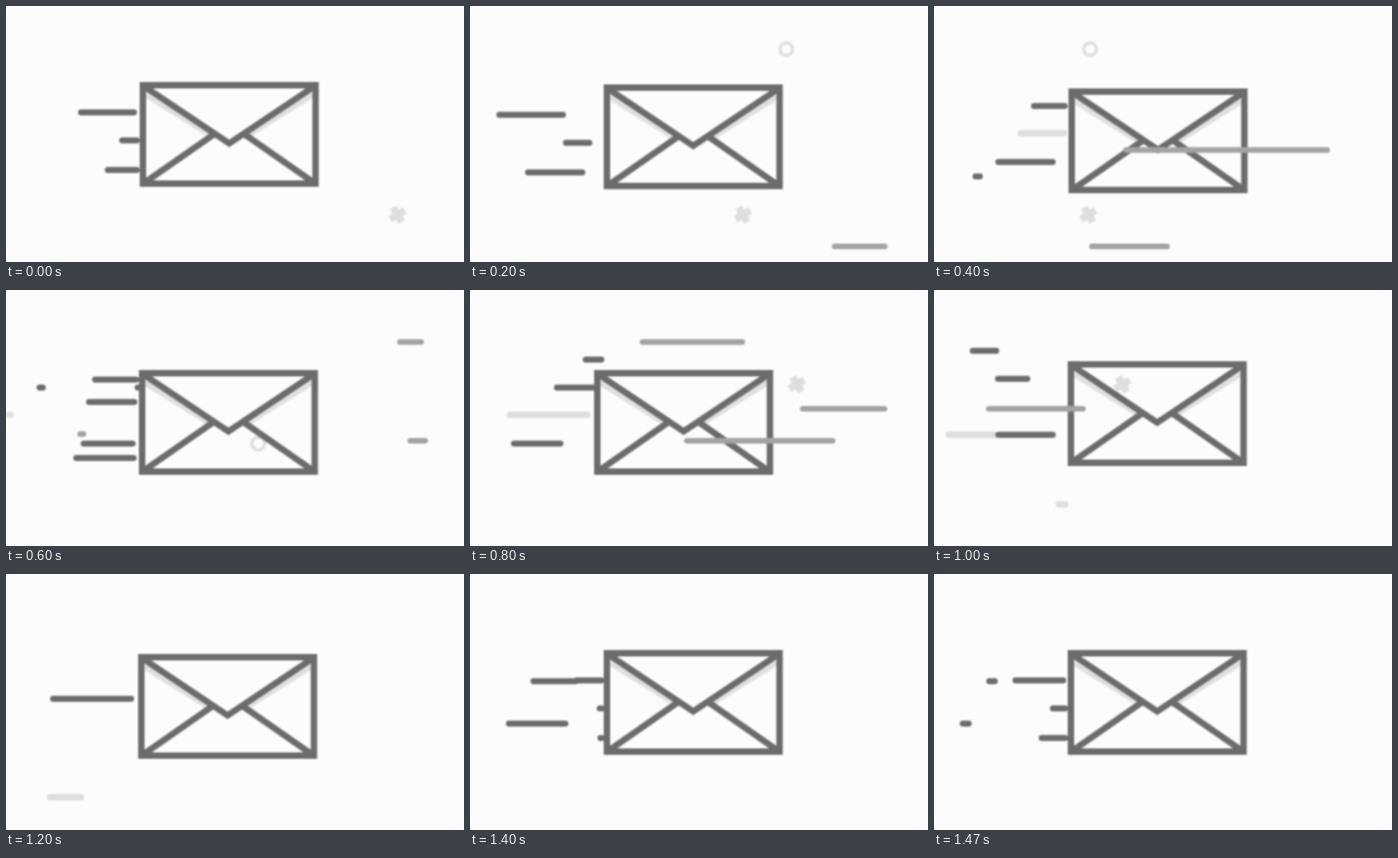
Write an HTML page with a canvas that moves like this. It is 572 px wide and 320 px high and loops after 1.59 s.

```html
<!DOCTYPE html>
<html>
<head>
<meta charset="utf-8">
<title>Flying envelope</title>
<style>
  html, body { margin: 0; width: 100%; height: 100%; overflow: hidden; background: #fcfcfc; }
  canvas { display: block; filter: blur(1.3px); }
</style>
</head>
<body>
<canvas id="stage" width="572" height="320"></canvas>
<script>
const ctx = document.getElementById('stage').getContext('2d');
const LOOP = 1590, PERIOD = 1490;
const DARK = '#6c6c6c', GRAY = '#a3a3a3', LIGHT = '#dedede';

// Envelope offset every 200 ms
const drift = [[0, 0], [0, 3], [1, 8], [-1, 5], [-12, 5], [0, -6], [-2, 5], [0, 0], [0, 0]];

// Streaks shoot left from `from`; each lane is y, start time, reach
const trail = { color: DARK, width: 7.5, from: 168, life: 260, follow: true, lanes: [
  [187, 267, 120], [117, 348, 130], [135, 518, 128], [205, 518, 158], [107, 538, 144],
  [82, 770, 125], [187, 867, 120], [151, 1111, 199], [187, 1220, 136], [134, 1223, 103]] };
const slowTrail = { ...trail, life: 530, lanes: [
  [187, 406, 125], [117, 580, 96], [133, 1327, 150], [168, 1355, 60], [205, 1380, 120]] };
const haze = { ...trail, color: LIGHT, width: 8, lanes: [
  [151, 345, 168], [151, 678, 170], [187, 896, 240], [274, 982, 120]] };
const wind = { color: GRAY, width: 7, from: 522, life: 260, follow: false, lanes: [
  [300.5, 171, 333], [65, 586, 320], [148.5, 767, 462]] };
const slowWind = { ...wind, from: 527, life: 350, lanes: [[180, 253, 438], [188.5, 585, 305]] };

const confetti = [
  { shape: cross, y: 261, start: 1475, speed: .74 },
  { shape: ring, y: 54, start: 95, speed: 1 },
  { shape: ring, y: 192, start: 415, speed: 1 },
  { shape: cross, y: 118, start: 694, speed: .865 }
];

const mix = (a, b, k) => a + (b - a) * k;
const ageOf = (start, t) => (t - start + PERIOD) % PERIOD;

function stroke(color, width, ...points) {
  ctx.strokeStyle = color;
  ctx.lineWidth = width;
  ctx.beginPath();
  points.forEach(([x, y]) => ctx.lineTo(x, y));
  ctx.stroke();
}

function drawStreaks({ color, width, from, life, follow, lanes }, t, dy) {
  ctx.lineCap = 'round';
  for (const [lane, start, reach] of lanes) {
    const p = ageOf(start, t) / life;
    if (p > 1) continue;
    // The head slows down while the tail catches up
    const left = from - reach * (1 - (1 - p) ** 2);
    const right = from - reach * p ** 3;
    if (right - left < 4) continue;
    const y = lane + (follow ? dy : 0), cap = Math.min(width, right - left) / 2;
    stroke(color, width, [left + cap, y], [Math.max(left + cap + .1, right - cap), y]);
  }
}

function cross() {
  ctx.rotate(.25);
  stroke(LIGHT, 9, [-7.5, -7.5], [7.5, 7.5]);
  stroke(LIGHT, 9, [-7.5, 7.5], [7.5, -7.5]);
}

function ring() {
  ctx.strokeStyle = LIGHT;
  ctx.lineWidth = 4;
  ctx.beginPath();
  ctx.arc(0, 0, 8, 0, Math.PI * 2);
  ctx.stroke();
}

function drawConfetti(t) {
  ctx.lineCap = 'butt';
  for (const { shape, y, start, speed } of confetti) {
    const x = 500 - speed * ageOf(start, t);
    if (x < 130) continue;
    ctx.save();
    ctx.translate(x, y);
    shape();
    ctx.restore();
  }
}

function drawEnvelope(dx, dy) {
  ctx.save();
  ctx.translate(dx, dy);
  ctx.lineCap = 'butt';
  const center = 278.8;
  for (const side of [-1, 1]) {
    const at = (offset, y) => [center + side * offset, y];
    stroke('#e0e0e0', 7, at(104, 111), at(26, 160));
    stroke(DARK, 8, at(106, 221), at(20, 161));
  }
  stroke(DARK, 8, [center - 107, 100], [center, 171.8], [center + 107, 100]);
  ctx.lineWidth = 8;
  ctx.strokeRect(center - 107.8, 99, 215.6, 123);
  ctx.restore();
}

function render(now) {
  // The picture holds for 70 ms, then for 130 ms
  const time = now % LOOP, step = Math.floor(time / 200);
  const t = step * 200 + (time - step * 200 < 70 ? 0 : 70);
  const k = (t - step * 200) / 200, ease = k * k * (3 - 2 * k);
  const [dx, dy] = drift[step].map((v, i) => mix(v, drift[step + 1][i], ease));

  ctx.fillStyle = '#fcfcfc';
  ctx.fillRect(0, 0, 572, 320);
  drawConfetti(t);
  for (const kind of [haze, trail, slowTrail]) drawStreaks(kind, t, dy);
  drawEnvelope(dx, dy);
  for (const kind of [wind, slowWind]) drawStreaks(kind, t, dy);
  requestAnimationFrame(render);
}
requestAnimationFrame(render);
</script>
</body>
</html>
```
